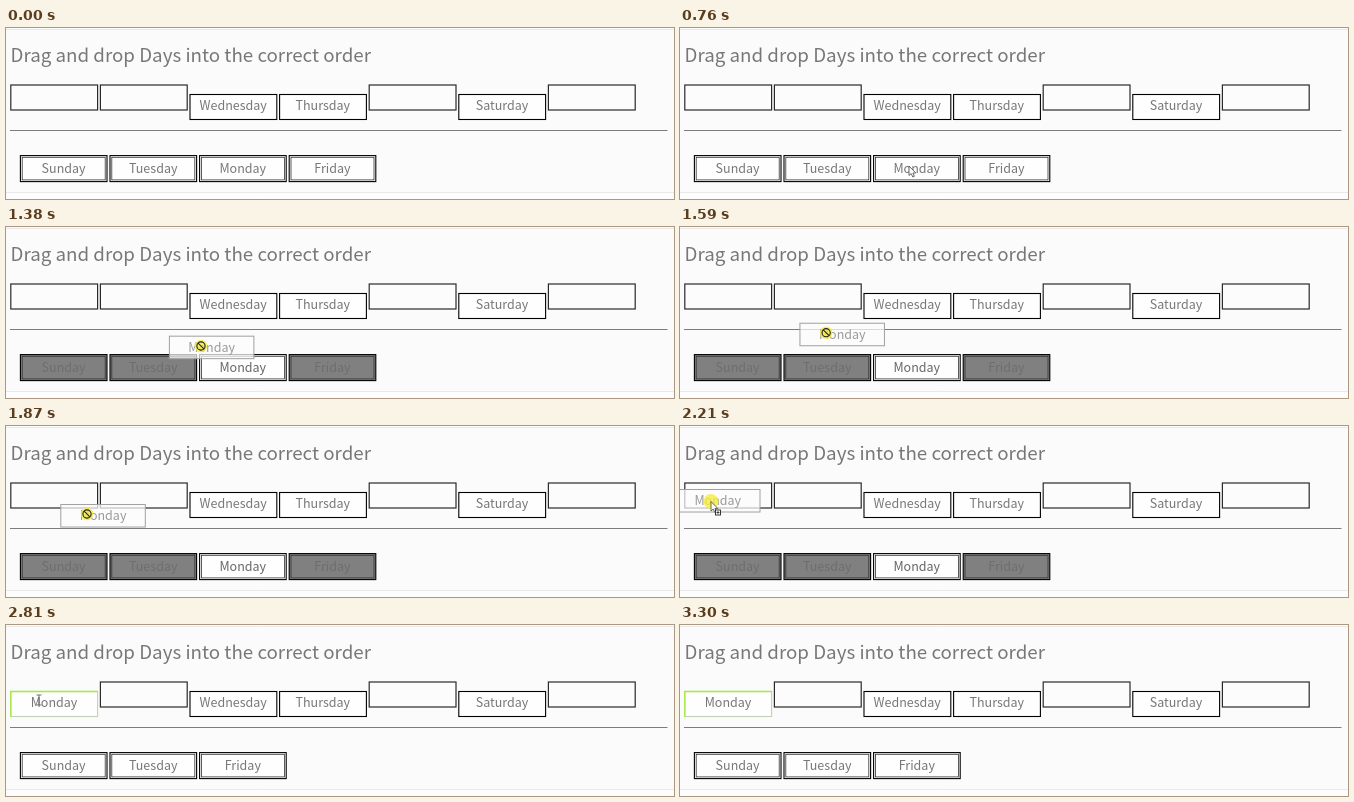
Write an HTML page that moves like this. It is 668x171 px and loops after 4.03 s.

```html
<!DOCTYPE html>
<html lang="en">
<head>
<meta charset="utf-8">
<title>Order the days</title>
<style>
  html, body { margin: 0; width: 100%; height: 100%; overflow: hidden; background: #fbfbfb; }
  svg { display: block; }
  text { font: 12.5px "Noto Sans CJK JP", "Noto Sans CJK SC", "Noto Sans CJK", "Noto Sans", sans-serif; fill: #777; text-anchor: middle; }
  .title { font-size: 18.75px; text-anchor: start; }
</style>
</head>
<body>
<svg id="stage" width="668" height="171" viewBox="0 0 668 171"></svg>
<script>
const LOOP = 4030, STEP = 70, PITCH = 89.6;
const ENTER = 350, PRESS = 830, LIFT = 1030, OVER_SLOT = 2140, DROP = 2420, RELEASED = 2740, GONE = 3300;
const LAG = 40, GRAB_X = 35.5, GRAB_Y = 12;
const stage = document.getElementById('stage');

// Pointer stops: time, x, y
const stops = [
  [ENTER, 236, 166], [690, 229, 138], [LIFT, 229, 138], [1380, 195, 119], [1870, 81, 88],
  [2100, 31, 75.5], [RELEASED, 31, 75.5], [2810, 33, 75], [3230, 119, 161]
];

function pointerAt(t) {
  const next = stops.findIndex(s => s[0] > t);
  if (next < 0) return stops.at(-1).slice(1);
  const [t0, x0, y0] = stops[next - 1], [t1, x1, y1] = stops[next];
  const k = (t - t0) / (t1 - t0);
  return [x0 + (x1 - x0) * k, y0 + (y1 - y0) * k];
}

// The screen refreshes in short steps, restarted at each phase.
function snap(t) {
  const phase = [0, 690, LIFT, OVER_SLOT, RELEASED].findLast(p => p <= t);
  return t - (t - phase) % STEP;
}

const rect = (x, y, w, h, fill, stroke = 'none', width = 1) =>
  `<rect x="${x}" y="${y}" width="${w}" height="${h}" fill="${fill}" stroke="${stroke}" stroke-width="${width}"/>`;
const path = (d, stroke, width = 1, fill = 'none') =>
  `<path d="${d}" stroke="${stroke}" stroke-width="${width}" fill="${fill}"/>`;
const label = (x, y, s, fill = '#777') =>
  `<text x="${x}" y="${y}" style="fill:${fill}">${s}</text>`;

function slot(day, i, dropped) {
  const x = 4.8 + PITCH * i;
  if (!day) return rect(x, 57, 86.8, 25, '#fcfcfc', '#2a2a2a', 1.2);
  const box = rect(x, 66.5, 86.8, 25, '#fefefe', dropped ? '#c6d0b4' : '#000', 1.1);
  const accent = dropped ? path(`M${x} 92v-25.5h87`, '#a5ea3c', 1.3) : '';
  return box + accent + label(x + 43.2, 82.4, day);
}

function card(day, i, dragging) {
  const x = 14.4 + PITCH * i, dim = dragging && day !== 'Monday';
  return rect(x, 127.6, 86.6, 26, dim ? '#808080' : '#fefefe', '#000', 1.1) +
    rect(x + 1.8, 129.3, 83, 22.6, 'none', '#333', .8) +
    label(x + 43.2, 145, day, dim ? '#6e6e6e' : dragging ? '#666' : '#777');
}

// The dragged copy trails the pointer slightly.
function ghost(t) {
  const [px, py] = pointerAt(Math.max(LIFT, t - LAG));
  const x = px - GRAB_X, y = py - GRAB_Y;
  return rect(x, y, 84.5, 22.5, 'rgba(253,253,253,.72)', '#a0a0a0') +
    label(x + 42.3, y + 15.7, 'Monday', '#999');
}

function pointer(t) {
  const [x, y] = pointerAt(t);
  const arrow = path('M0 0V9.5L2.2 7.6L3.8 11L5.4 10.3L3.9 7H6.8Z', '#444', .8, '#fff');
  const noDrop = '<circle r="4.1" fill="none" stroke="#222" stroke-width="1.1"/>' + path('M-2.9 -2.9L2.9 2.9', '#222', 1.1);
  const copy = rect(4.5, 8.5, 5, 5, '#fff', '#222', .9) + path('M5.5 11h3M7 9.5v3', '#222', .8);
  const beam = path('M-2.5 -5H2.5M0 -5V5M-2.5 5H2.5', '#666', .9);
  const halo = t >= PRESS && t < RELEASED
    ? `<circle r="${t < OVER_SLOT ? 6.3 : 7.5}" fill="#f5ec3f" opacity=".8"/>` : '';
  let shape = arrow;
  if (t >= LIFT && t < OVER_SLOT) shape = noDrop;
  else if (t >= OVER_SLOT && t < DROP) shape = arrow + copy;
  else if (t >= RELEASED && t < 2900) shape = beam;
  return `<g transform="translate(${x} ${y})">${halo}${shape}</g>`;
}

function scene(t) {
  const dropped = t >= DROP, dragging = t >= PRESS && !dropped;
  const slots = [dropped && 'Monday', '', 'Wednesday', 'Thursday', '', 'Saturday', ''];
  const cards = ['Sunday', 'Tuesday', 'Monday', 'Friday'].filter(d => !dropped || d !== 'Monday');
  return rect(0, 0, 668, 171, '#fdfdfd') + rect(0, 1, 668, 164, '#fbfbfb') +
    path('M0 1.5H668M0 164.5H668', '#e9e9e9') +
    '<text class="title" x="4.5" y="34.4">Drag and drop Days into the correct order</text>' +
    slots.map((d, i) => slot(d, i, i === 0)).join('') +
    path('M4 102.5H661.5', '#7c7c7c') +
    cards.map((d, i) => card(d, i, dragging)).join('') +
    (t >= LIFT && !dropped ? ghost(t) : '') +
    (t >= ENTER && t < GONE ? pointer(t) : '');
}

let shown = -1;
const start = performance.now();
function tick() {
  const t = snap((performance.now() - start) % LOOP);
  if (t !== shown) stage.innerHTML = scene(shown = t);
  requestAnimationFrame(tick);
}
tick();
</script>
</body>
</html>
```
